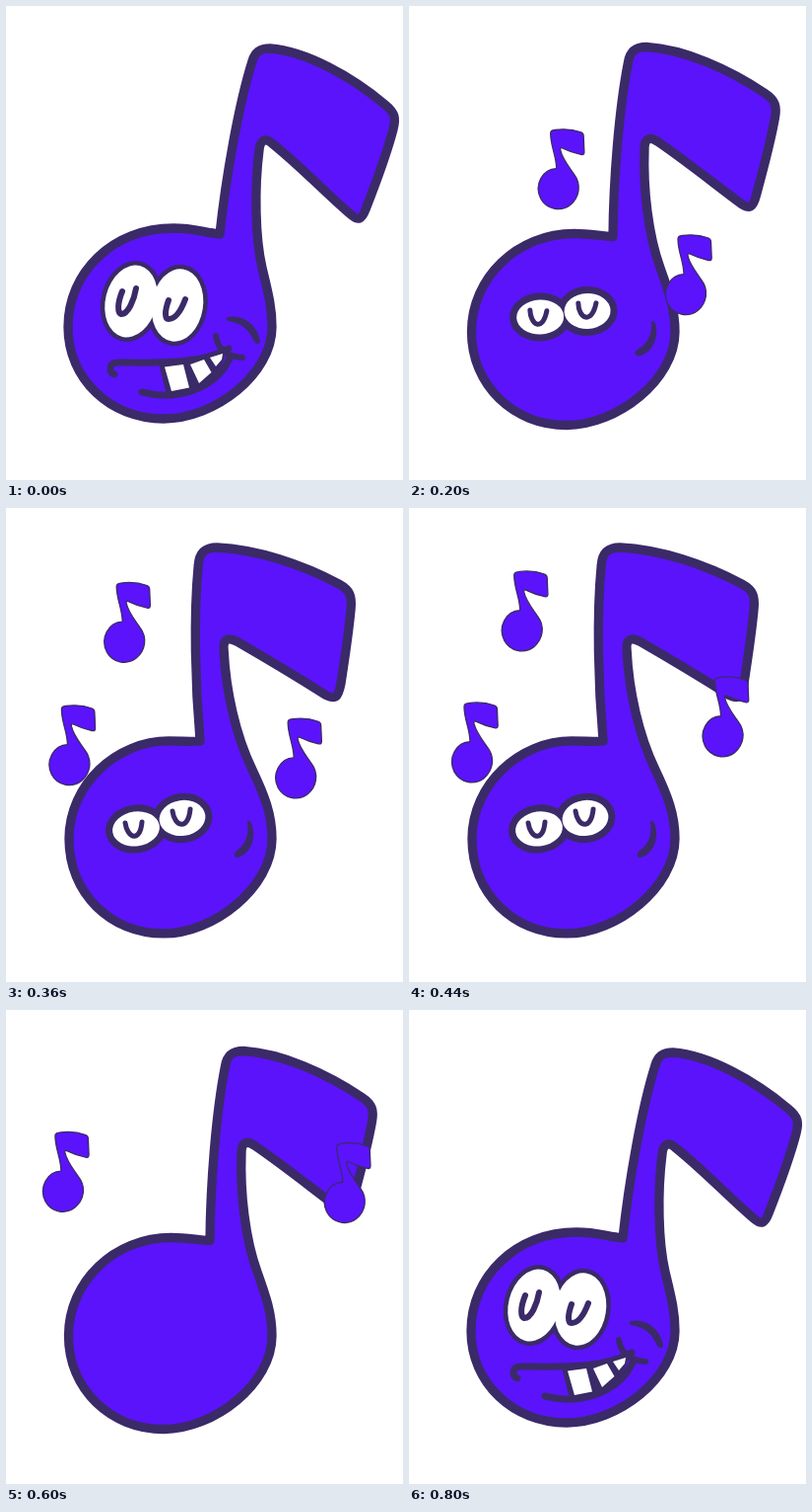
These frames come from a looping animation (403x480 px, 840 ms). An HTML page:

```html
<!DOCTYPE html>
<html lang="en">
<head>
<meta charset="utf-8">
<title>Dancing note</title>
<style>
  html, body { margin: 0; width: 100%; height: 100%; overflow: hidden; background: #fff; }
  svg { display: block; width: 403px; height: 480px; }
  .ink { fill: #3b2a68; }
  .line { fill: none; stroke: #3b2a68; stroke-linecap: round; stroke-linejoin: round; }
  .skin { fill: #5b13fc; stroke: #3b2a68; stroke-linejoin: round; }
  .white { fill: #fff; }
</style>
</head>
<body>
<svg viewBox="0 0 403 480">
  <defs>
    <path id="note" class="skin" stroke-width="1.3" d="M-2 -20.4 C-2 -33 -8 -43 -8 -56 Q-8 -59 -4 -59.5 C6 -61 15 -60 23 -57 Q25.5 -56 25.5 -53 L26.2 -37 Q26.2 -33.5 23 -34.5 C16 -36 10 -38 4 -41 Q1.5 -42 2 -39 C4 -30 10 -23 15.5 -15 C24 -4 21 9 12 16.5 C2 24 -12 21 -18 10 C-25 -4 -16 -20 -2 -20.4 Z"/>
    <g id="wideEyes">
      <ellipse cx="127" cy="299" rx="26" ry="37" transform="rotate(14 127 299)"/>
      <ellipse cx="174" cy="303" rx="26" ry="37" transform="rotate(9 174 303)"/>
    </g>
    <g id="sleepyEyes">
      <ellipse cx="132" cy="325" rx="24" ry="17.5" transform="rotate(-8 132 325)"/>
      <ellipse cx="179" cy="314" rx="23.5" ry="18" transform="rotate(-8 179 314)"/>
    </g>
  </defs>

  <path id="body" class="skin" stroke-width="9.3"/>

  <g id="grin">
    <use href="#wideEyes" class="line" stroke-width="9"/>
    <use href="#wideEyes" class="white"/>
    <g class="line" stroke-width="6">
      <path d="M118 289 C113 301 113 311 117 312 C124 312 130 298 132 286"/>
      <path d="M165 298 C161 309 161 317 165 317 C173 317 179 305 182 297"/>
    </g>
    <path class="ink" d="M155 362 L224 350 C218 375 196 393 163 394 Z"/>
    <g class="line" stroke-width="7">
      <path d="M110 373 C104 371 104 361 114 361 C150 361 195 364 226 347"/>
      <path d="M138 391 C172 400 212 389 227 357"/>
      <path d="M213 334 C215 347 224 355 240 356" stroke-width="6"/>
    </g>
    <path class="ink" d="M225 315 C240 312 255 322 258 339 C258 343 254 343 252 340 C247 328 239 321 225 319 Q222 317 225 315 Z"/>
    <path class="white" d="M161 365.5 L180 363 L186 386.5 L168 390 Z M187 363 L201 358 L208.500 371 L196 382 Z M207 356 L220 352 L219 358 L213 365 Z"/>
  </g>

  <g id="sleepy">
    <use href="#sleepyEyes" class="line" stroke-width="14"/>
    <use href="#sleepyEyes" class="white"/>
    <g class="line" stroke-width="5">
      <path d="M121 319 C123 334 136 340 138 318"/>
      <path d="M169 307 C171 323 185 327 187 305"/>
    </g>
    <path class="ink" d="M245 318 Q246 315 249 319 C255 334 248 352 234 354 Q229 352 234 347 C243 341 247 331 245 318 Z"/>
  </g>

  <use href="#note" class="small"/>
  <use href="#note" class="small"/>
  <use href="#note" class="small"/>
</svg>
<script>
const STEP = 40, STEPS = 21, NOTE_LIFE = 440;

const leanLeft = `M197 236 C192 180 190 110 195 58 C196 44 203 40 214 40
  C255 42 300 57 338 77 C349 83 351 89 350 101 C348 125 344 150 340 177
  C337 193 334 194 324 189 C297 172 267 154 234 135 C224 130 220 134 221 144
  C223 185 233 230 250 265 C262 290 270 310 270 335 C270 384 211 431 160 431
  C106 431 64 390 64 335 C64 280 112 236 165 236 C180 236 188 237 197 236 Z`;
const leanRight = `M217 231 C223 175 236 100 250 56 C253 45 260 43 268 43
  C305 46 350 71 385 100 C395 108 396 114 393 125 C386 152 376 178 365 206
  C361 217 357 217 351 212 C325 190 300 163 270 139 C263 133 258 136 257 146
  C252 185 253 235 260 265 C266 290 270 305 270 325 C270 373 212 418 160 418
  C106 418 63 378 63 325 C63 270 108 225 170 225 C190 225 200 229 217 231 Z`;

// Paths of the small notes over eased progress e
const notes = [
  { start: 80, x: e => 156 - 54 * e + 12 * e * e, y: e => 190.5 - 68 * e },
  { start: 200, x: e => 281 + 4 * Math.min(1, 40 * e) + 45 * e + 14 * e * e, y: e => 292 - 97.5 * e },
  { start: 360, x: e => 64.4 - 17 * e + 10.6 * e * e, y: e => 260 - 118 * e - 7 * e * e }
];

const $ = id => document.getElementById(id);
const body = $('body'), grin = $('grin'), sleepy = $('sleepy');
const small = document.querySelectorAll('.small');

const ease = u => u < 0.5 ? 4 * u ** 3 : 1 - 4 * (1 - u) ** 3;
const show = (el, on) => el.setAttribute('visibility', on ? 'visible' : 'hidden');
const turn = (el, deg) => el.setAttribute('transform', `rotate(${deg} 228 331)`);

const rightValues = leanRight.match(/\d+/g).map(Number);
function blend(p) {
  let i = 0;
  return leanLeft.replace(/\d+/g, n => (+n + (rightValues[i++] - n) * p).toFixed(2));
}

function draw(t) {
  const lean = ease(Math.min(1, Math.abs(t - 400) / 400));
  body.setAttribute('d', blend(lean));

  show(grin, t < 160 || t > 600);
  show(sleepy, t >= 160 && t < 600);
  turn(grin, -12 * (1 - lean));
  turn(sleepy, 12 * lean);

  notes.forEach((n, i) => {
    const u = (t - n.start) / NOTE_LIFE, on = u >= 0 && u < 1;
    show(small[i], on);
    if (!on) return;
    const e = ease(u);
    small[i].setAttribute('transform', `translate(${n.x(e)} ${n.y(e)})`);
  });
}

const origin = performance.now();
function tick() {
  const step = Math.floor(Math.max(0, performance.now() - origin) / STEP) % STEPS;
  draw(step * STEP);
  requestAnimationFrame(tick);
}
tick();
</script>
</body>
</html>
```
